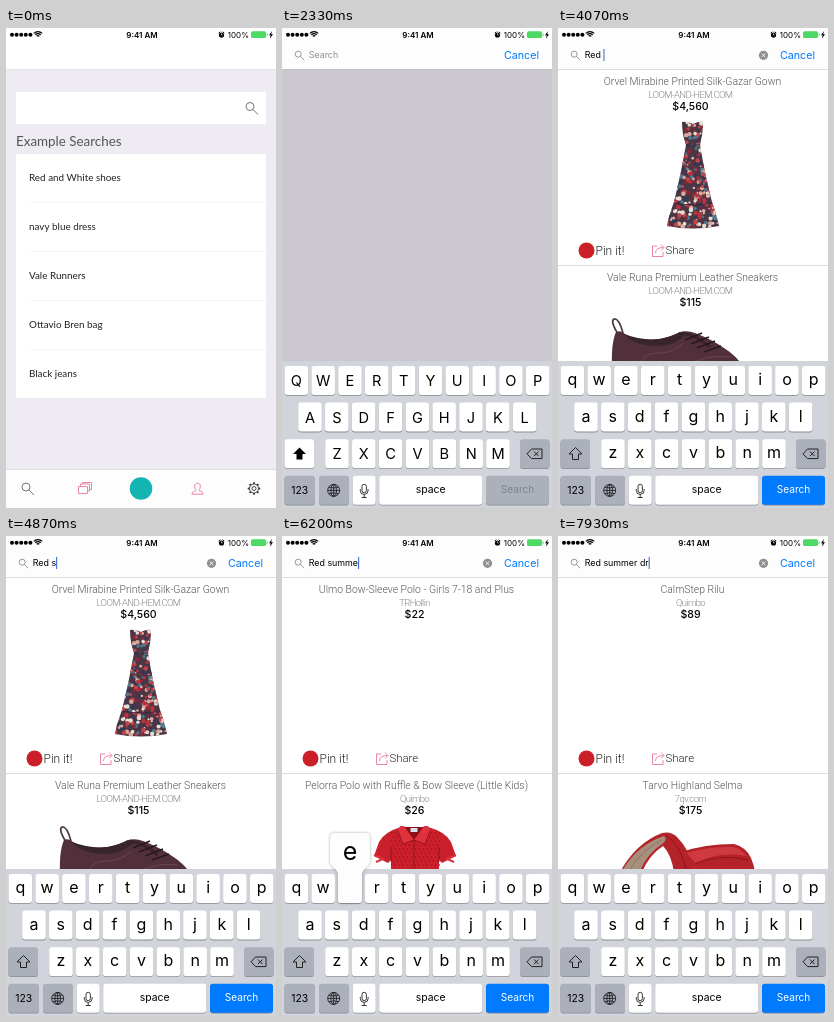
An HTML page with a canvas that plays this animation: 270x480 px, repeating every 8 s.

```html
<!DOCTYPE html>
<html lang="en">
<head>
<meta charset="utf-8">
<title>Product search</title>
<style>
  html, body { margin: 0; width: 100%; height: 100%; overflow: hidden; background: #fff; }
  canvas { display: block; width: 100vw; height: 100vh; }
</style>
</head>
<body>
<canvas></canvas>
<script>
const LOOP = 8000, W = 270, H = 480;
const canvas = document.querySelector('canvas');
const ctx = canvas.getContext('2d');

const UI = 'Inter, sans-serif', THIN = 'Roboto, sans-serif', ROUND = 'Lato, sans-serif';
const BLUE = '#007aff', PINK = '#e8799a', DARK_KEY = '#abb0bb';

// When each character is pressed.
const typed = [
  [3000, 'R'], [3270, 'e'], [3540, 'd'], [3870, ' '],
  [4730, 's'], [5200, 'u'], [5670, 'm'], [5930, 'm'], [6200, 'e'], [6430, 'r'],
  [7130, ' '], [7470, 'd'], [7730, 'r']
];
const PRESS = 115;

// Result lists; a null list is an empty table.
const results = [
  [3000, null],
  [3740, [
    { title: 'Orvel Mirabine Printed Silk-Gazar Gown', store: 'LOOM-AND-HEM.COM', price: '$4,560', picture: drawGown },
    { title: 'Vale Runa Premium Leather Sneakers', store: 'LOOM-AND-HEM.COM', price: '$115', picture: drawSneaker }
  ]],
  [5460, [
    { title: 'Ulmo Bow-Sleeve Polo - Girls 7-18 and Plus', store: 'TRHollin', price: '$22' },
    { title: 'Pelorra Polo with Ruffle & Bow Sleeve (Little Kids)', store: 'Quimbo', price: '$26', picture: drawPolo }
  ]],
  [6670, null],
  [7530, [
    { title: 'CalmStep Rilu', store: 'Quimbo', price: '$89' },
    { title: 'Tarvo Highland Selma', store: '7qv.com', price: '$175', picture: drawSandal }
  ]]
];

const clamp = v => Math.max(0, Math.min(1, v));
const progress = (t, from, to) => clamp((t - from) / (to - from));

function rect(x, y, w, h, color) {
  ctx.fillStyle = color;
  ctx.fillRect(x, y, w, h);
}
function roundRect(x, y, w, h, r, color) {
  ctx.fillStyle = color;
  ctx.beginPath();
  ctx.roundRect(x, y, w, h, r);
  ctx.fill();
}
function circle(x, y, r, color) {
  ctx.fillStyle = color;
  ctx.beginPath();
  ctx.arc(x, y, r, 0, 7);
  ctx.fill();
}
function fill(d, color) {
  ctx.fillStyle = color;
  ctx.fill(new Path2D(d));
}
function stroke(d, color, width = 1) {
  ctx.strokeStyle = color;
  ctx.lineWidth = width;
  ctx.stroke(new Path2D(d));
}
function text(s, x, y, size, color, { font = UI, weight = 400, align = 'left', spacing = 0 } = {}) {
  ctx.font = `${weight} ${size}px ${font}`;
  ctx.letterSpacing = spacing + 'px';
  ctx.textAlign = align;
  ctx.fillStyle = color;
  ctx.fillText(s, x, y);
}
function at(x, y, draw) {
  ctx.save();
  ctx.translate(x, y);
  draw();
  ctx.restore();
}
function magnifier(x, y, r, color, width) {
  at(x, y, () => stroke(`M${r} 0A${r} ${r} 0 1 1 ${-r} 0A${r} ${r} 0 1 1 ${r} 0M${r * .7} ${r * .7}L${r * 2} ${r * 2}`, color, width));
}

function drawStatusBar() {
  for (let i = 0; i < 5; i++) circle(6 + i * 4.6, 6.7, 2, '#000');
  for (const r of [1.8, 3.8, 5.8]) {
    ctx.strokeStyle = '#000';
    ctx.lineWidth = 1.3;
    ctx.beginPath();
    ctx.arc(32, 9.5, r, -Math.PI * .75, -Math.PI * .25);
    ctx.stroke();
  }
  text('9:41 AM', 136, 9.7, 8, '#000', { weight: 600, align: 'center' });
  circle(215.5, 7, 2.6, '#000');
  stroke('M212.7 5.2l1.500-1.500M218.300 5.2l-1.500-1.500', '#000', 1);
  stroke('M215.5 5.3v1.700h1.3', '#fff', .6);
  text('100%', 243, 9.7, 8, '#000', { align: 'right' });
  roundRect(245, 3.3, 15, 6.8, 1.5, '#4cd964');
  rect(260.6, 5.5, 1, 2.4, '#4cd964');
  fill('M266 3l-3 4.3h1.7l-.8 3.4 3.1-4.4h-1.8z', '#000');
}

function drawHome() {
  rect(0, 0, W, H, '#eeecf2');
  rect(0, 0, W, 41, '#fff');
  rect(0, 41, W, .5, '#dcdbe0');
  rect(10, 64, 250, 32, '#fff');
  magnifier(244, 78.5, 4, '#777', 1);
  text('Example Searches', 10, 117.5, 13.4, '#555', { font: ROUND });
  rect(10, 126, 250, 244, '#fff');
  ['Red and White shoes', 'navy blue dress', 'Vale Runners', 'Ottavio Bren bag', 'Black jeans'].forEach((s, i) => {
    text(s, 23, 153.3 + i * 48.9, 9.9, '#222', { font: ROUND });
    if (i) rect(23, 125.5 + i * 48.9, 237, .5, '#ececef');
  });

  rect(0, 441, W, 39, '#fdfdfd');
  rect(0, 441, W, .6, '#c9c9cd');
  magnifier(20, 459, 4, '#777', 1);
  stroke('M72.5 458.5h9v7h-9zM74.5 458v-2h9v7h-2M76.5 456v-1.5h9v7h-2', PINK, .9);
  circle(135, 460.5, 11.3, '#13b5b1');
  stroke('M191.5 455.3c-4 0-3.2 5.4-1.2 6.6c0 1.4-4.4 1-4.4 4.3h11.2c0-3.3-4.4-2.9-4.4-4.3c2-1.2 2.8-6.6-1.2-6.6z', PINK, .9);
  at(248, 460.5, () => {
    stroke('M4.5 0A4.5 4.5 0 1 1-4.5 0A4.5 4.5 0 1 1 4.5 0M2 0A2 2 0 1 1-2 0A2 2 0 1 1 2 0', '#333', .9);
    for (let i = 0; i < 8; i++) {
      ctx.rotate(Math.PI / 4);
      stroke('M4.5 0h1.8', '#333', 1.7);
    }
  });
}

function drawGown() {
  const shape = new Path2D('M124 94q5-1 11 2q6-3 10-2q0 12-3 23q5 30 12 57q5 14 7 24q-26 5-52 0q2-11 7-24q7-28 12-57q-4-11-4-23z');
  ctx.save();
  ctx.clip(shape);
  rect(100, 90, 70, 115, '#4a3644');
  const colors = ['#b9323c', '#eadcd0', '#2b3a58', '#c2434a', '#4f7d8e', '#8d2536', '#dda79c'];
  let seed = 7;
  const random = () => (seed = seed * 16807 % 2147483647) / 2147483647;
  for (let i = 0; i < 420; i++) {
    circle(108 + random() * 54, 92 + random() * 108, .9 + random() * 1.5, colors[i % colors.length]);
  }
  stroke('M112 174q23 6 46 0M127 117h16', '#3a2438', .9);
  ctx.restore();
}
function drawSneaker() {
  stroke('M60 306q-8-13-4-15q5-1 9 14', '#4a3940', 1.7);
  fill('M54 340q-1-25 4-36q5-2 9 2q14 8 34 5q12-2 21-7q8-2 15 1q16 6 29 15q13 8 20 20z', '#52303b');
  fill('M66 306q18 7 36 5q11-2 20-7l5 3q-8 10-27 11q-24 0-34-12z', '#38252c');
  stroke('M124 305q14 2 28 14', '#3a222b', 3);
  stroke('M127 312l17-7M133 316l18-7M139 320l18-7M146 324l17-6', '#25191f', 1.6);
  stroke('M80 340q4-15 20-15q16 0 25-10M130 338q16-12 42-9', '#714b57', .8);
}
function drawPolo() {
  fill('M119 291q-17 5-22 15l-5 14 14 7 3-3v16h48v-16l3 3 14-7-5-14q-5-10-23-15z', '#c9202c');
  for (let y = 297; y < 333; y += 4) {
    for (let x = 109 + y % 8 / 2; x < 158; x += 4) circle(x, y, .7, '#96151f');
  }
  fill('M122 291h20l-10 14z', '#8c1019');
  rect(128.5, 292, 7, 4, '#d9e2ec');
  fill('M118 290h4l10 14-11 4-5-13zM146 290h-4l-10 14 11 4 5-13z', '#e0323c');
  stroke('M116 295l5 13 11-4 11 4 5-13M132 304v29M109 326v-15M157 326v-15', '#8c1019', .8);
  stroke('M92 319l9 4-7 3M174 319l-9 4 7 3', '#d8333d', 2);
}
function drawSandal() {
  fill('M62 336q16-29 42-39q9-2 15 4q12 12 19 35z', '#b5232a');
  fill('M64 335q15-26 42-35q4 4-2 8q-15 10-22 27z', '#a78f7c');
  stroke('M71 335q12-21 33-31', '#8f7564', 1);
  fill('M84 336q7-17 21-26q8 8 11 26z', '#fff');
  fill('M124 316q22-8 52-8q12 3 17 14q3 7 4 14h-59q-4-12-14-20z', '#b5232a');
  fill('M129 317q22-7 46-6q9 2 13 9q-26-5-51 7z', '#cf3a40');
  stroke('M108 299q14 9 21 36M137 328q26-11 53-4', '#7f1219', .8);
}

function drawItem(item, top) {
  const center = { font: THIN, weight: 300, align: 'center' };
  text(item.title, 134.5, top + 16, 10.4, '#555', center);
  text(item.store, 132.5, top + 29, 9.5, '#888', { ...center, spacing: -.6 });
  text(item.price, 132.5, top + 41.3, 10.6, '#000', { weight: 500, align: 'center' });
  if (item.picture) item.picture();
  circle(28.5, top + 181.5, 8, '#cb2027');
  text('Pin it!', 37.5, top + 185.7, 12, '#222', { font: THIN, weight: 300 });
  at(94, top + 175, () => stroke('M5 2H.5v10.500h10.500V8M3.500 9q0-5.500 8-5.500M9 .5l3 3-3 3', PINK, .9));
  text('Share', 107.500, top + 185.3, 11.4, '#222', { font: THIN, weight: 300 });
  rect(0, top + 196, W, .7, '#cfcfd2');
}
function drawResults(t) {
  rect(0, 41, W, H, '#fff');
  const items = results.findLast(([start]) => t >= start)[1];
  if (items) items.forEach((item, i) => drawItem(item, 41 + i * 196));
  else for (let i = 0; i < 10; i++) rect(13, 70 + i * 28.7, W, .7, '#d6d6da');
}

function drawSearchBar(t, query) {
  rect(0, 0, W, 41, '#fdfdfe');
  rect(0, 41, W, .5, '#b9b9be');
  magnifier(16.2, 26.2, 3, '#8e8e93', .9);
  text(query || 'Search', 26.7, 30.3, 8.9, query ? '#000' : '#8e8e93');

  const lastInput = typed.findLast(([start]) => t >= start)?.[0] ?? 600;
  if (t >= 600) {
    const age = t - lastInput - 600, phase = age % 930;
    ctx.globalAlpha = age < 0 ? 1 : phase < 400 ? 1 - progress(phase, 0, 170) : progress(phase, 400, 600);
    rect(26.7 + (query ? ctx.measureText(query).width : 0), 21, 1.1, 12, '#416dda');
    ctx.globalAlpha = 1;
  }
  if (query) {
    circle(205.5, 27.3, 4.6, '#8e8e93');
    stroke('M203.7 25.500l3.600 3.600m0-3.600l-3.600 3.600', '#fff', .9);
  }
  ctx.save();
  ctx.beginPath();
  ctx.rect(0, 0, 262.5, 41);
  ctx.clip();
  text('Cancel', 222 + 41 * (1 - progress(t, 330, 700)) ** 1.5, 31, 10.7, BLUE);
  ctx.restore();
}

function drawKey(x, y, w, color = '#fff') {
  roundRect(x, y + .8, w, 29, 3, '#878a90');
  roundRect(x, y, w, 29, 3, color);
}
function drawPopup(letter, x, y) {
  ctx.save();
  ctx.shadowColor = 'rgba(0,0,0,.35)';
  ctx.shadowBlur = 3;
  at(x, y, () => fill('M-15-41H15q5 0 5 5V-13q0 4-4 7q-4 3-4 7V26q0 3-3 3H-9q-3 0-3-3V1q0-4-4-7q-4-3-4-7V-36q0-5 5-5z', '#fdfdfd'));
  ctx.restore();
  text(letter, x, y - 14, 25, '#000', { align: 'center' });
}
function drawKeyboard(t, query) {
  const upper = !query;
  const press = typed.find(([start]) => t >= start && t < start + PRESS);
  const pressed = press?.[1];
  const center = { align: 'center' };
  let popup;

  rect(0, 333, W, 147, '#d1d4da');
  ['qwertyuiop', 'asdfghjkl', 'zxcvbnm'].forEach((row, r) => {
    [...row].forEach((letter, i) => {
      const x = [14.3, 28, 55][r] + i * 26.83, y = 338 + r * 36.6;
      drawKey(x - 11.8, y, 23.600);
      text(upper ? letter.toUpperCase() : letter, x, y + (upper ? 20 : 19), upper ? 14.6 : 16, '#000', center);
      if (pressed?.toLowerCase() === letter) popup = [pressed, x, y];
    });
  });

  drawKey(2.5, 411.2, 29.5, upper ? '#fff' : DARK_KEY);
  const arrow = 'M17.500 419.500l6.500 6.500h-3.500v5.500h-6v-5.500H11z';
  if (upper) fill(arrow, '#000');
  else stroke(arrow, '#222', 1);
  drawKey(238, 411.2, 29.5, DARK_KEY);
  stroke('M245 425.800l4.500-4.800h10.500v9.600h-10.500zM252 423.500l4.600 4.600m0-4.600l-4.600 4.600', '#222', 1);

  const y = 447.800;
  drawKey(2.5, y, 30.5, DARK_KEY);
  text('123', 17.7, y + 18.3, 10.4, '#000', center);
  drawKey(37, y, 30, DARK_KEY);
  at(51.7, y + 14.6, () => stroke(
    'M6 0A6 6 0 1 1-6 0A6 6 0 1 1 6 0M-6 0H6M0-6V6M2.800 0A2.800 6 0 1 1-2.800 0A2.800 6 0 1 1 2.800 0M-4.800-3.300Q0-1.500 4.800-3.300M-4.800 3.300Q0 1.500 4.800 3.300', '#111', .8));
  drawKey(70.7, y, 23, '#fff');
  stroke('M80 458.500a2.200 2.200 0 0 1 4.400 0v4a2.200 2.200 0 0 1-4.400 0zM78.300 461v1.500a3.900 3.900 0 0 0 7.800 0V461M82.200 466.500v3M79.700 469.500h5', '#222', .9);
  drawKey(97.2, y, 103, pressed === ' ' ? DARK_KEY : '#fff');
  text('space', 148.7, y + 17.200, 10.4, '#000', center);
  drawKey(204, y, 63, upper ? DARK_KEY : BLUE);
  text('Search', 235.5, y + 17.500, 10.1, upper ? '#7f838c' : '#fff', center);
  if (popup) drawPopup(...popup);
}

function draw(t) {
  const query = typed.filter(([start]) => t >= start).map(([, c]) => c).join('');
  if (t < 500) drawHome();
  if (t >= 330) {
    if (query) drawResults(t);
    else {
      const dim = progress(t, 330, 780);
      ctx.globalAlpha = progress(t, 330, 490);
      rect(0, 41, W, H, `rgb(${238 - 36 * dim}, ${236 - 36 * dim}, ${242 - 36 * dim})`);
      ctx.globalAlpha = 1;
    }
    drawSearchBar(t, query);
    const slide = 147 * (1 - progress(t, 330, 680)) ** 4;
    at(0, slide, () => drawKeyboard(t, query));
  }
  drawStatusBar();
}

function frame() {
  const ratio = window.devicePixelRatio || 1;
  const width = Math.round(innerWidth * ratio), height = Math.round(innerHeight * ratio);
  if (canvas.width !== width || canvas.height !== height) {
    canvas.width = width;
    canvas.height = height;
  }
  ctx.setTransform(width / W, 0, 0, height / H, 0, 0);
  draw(performance.now() % LOOP);
  requestAnimationFrame(frame);
}
frame();
</script>
</body>
</html>
```
